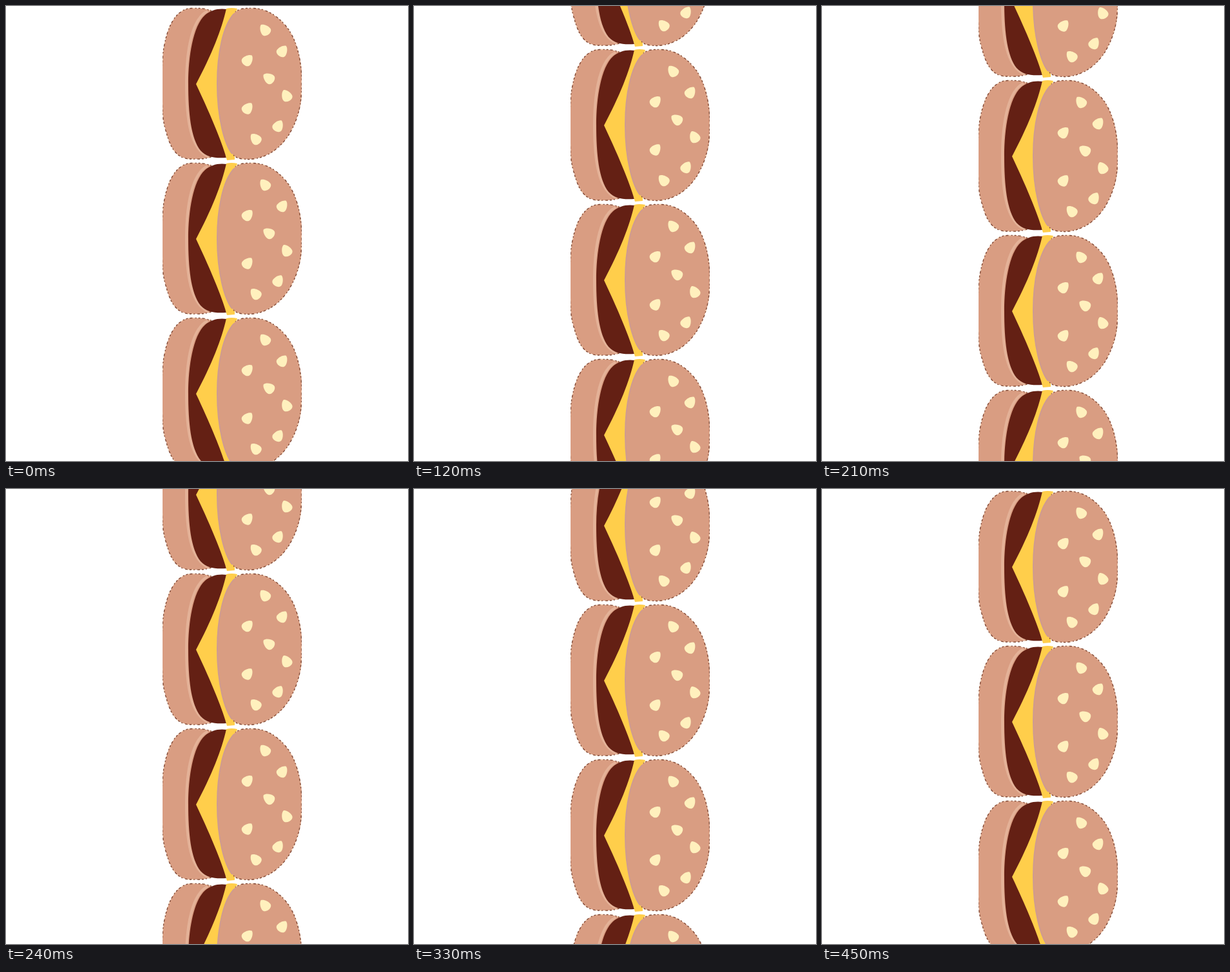
An HTML page with a canvas for the animation above (480 ms loop, 624 by 705 pixels).

```html
<!DOCTYPE html>
<html lang="en">
<head>
<meta charset="utf-8">
<title>Burger stack</title>
<style>
  html, body { margin: 0; width: 100%; height: 100%; overflow: hidden; background: #fff; }
  canvas { display: block; }
</style>
</head>
<body>
<canvas id="stage" width="624" height="705"></canvas>
<script>
const ctx = document.getElementById('stage').getContext('2d');
const LOOP = 480, STEP = 30, SHIFT = 16, PITCH = 240;

const bottomBun = new Path2D(`M318 7 C310 4 300 3 288 3.5 C267 4 255 25 249 47
  C244 65 242 80 242 120 C242 160 243 177 248 193 C254 215 262 237 287 237
  C300 237.5 308 237 318 234 Z`);
const bunRim = new Path2D(`M313 8 C290 18 280 65 280 120 C280 176 286 222 315 234`);
const patty = new Path2D(`M343 5 C330 3 318 6 309 14 C290 31 283 80 283 120
  C283 166 287 205 302 224 C312 235 325 236 342 235 L322 120 Z`);
const cheese = new Path2D(`M342 4 Q350 2 359 4 L357 11 L338 60 L336 180 L355 231
  L355 238 L343 239 C337 216 321 176 295 121 C319 76 335 36 342 4 Z`);
const topBun = new Path2D(`M356 9 C362 4 372 3 384 3.5 C408 4 427 20 439 37
  C453 58 460 88 460 120 C460 151 454 174 440 198 C425 222 403 237 376 237.5
  C366 237.5 358 236 353 231 C340 215 328 176 328 120 C328 73 337 28 356 9 Z`);
const bunSide = new Path2D(`M354 12 C337 30 328 73 328 120 C328 176 340 215 351 229`);
const crust = new Path2D(`M356 9 C362 4 372 3 384 3.5 C408 4 427 20 439 37
  C453 58 459 88 459 120 C459 151 454 174 440 198 C425 222 403 237 376 237.5
  C366 237.5 358 236 353 231`);
const seed = new Path2D('M0 -10 C4 -9 8 -2 8 3 C8 7 4 9 0 9 C-4 9 -8 7 -8 3 C-8 -2 -4 -9 0 -10 Z');

// x, y, tilt in degrees
const seeds = [
  [402, 37, -38], [429, 70, 35], [375, 84, 42], [408, 112, -55],
  [435.5, 139, -28], [375, 158.5, 38], [422.5, 186, 30], [387.5, 206, -42]
];

function fill(path, color) {
  ctx.fillStyle = color;
  ctx.fill(path);
}

function line(path, color, width, dash = [], offset = 0) {
  ctx.strokeStyle = color;
  ctx.lineWidth = width;
  ctx.setLineDash(dash);
  ctx.lineDashOffset = offset;
  ctx.stroke(path);
}

function speckledEdge(path) {
  line(path, '#f3cfb0', 1.6, [2, 7, 3, 5]);
  line(path, '#824936', 1.4, [3, 3, 2, 4, 4, 3], 2);
}

function drawBurger(y) {
  ctx.save();
  ctx.translate(0, y);
  fill(bottomBun, '#d99d82');
  speckledEdge(bottomBun);
  line(bunRim, '#e4b298', 4);
  fill(patty, '#642014');
  fill(cheese, '#ffce4b');
  fill(topBun, '#d99d82');
  line(bunSide, '#cf9b90', 2);
  speckledEdge(crust);
  for (const [x, sy, tilt] of seeds) {
    ctx.save();
    ctx.translate(x, sy);
    ctx.rotate(tilt * Math.PI / 180);
    fill(seed, '#fff0bd');
    ctx.restore();
  }
  ctx.restore();
}

function render(time) {
  const offset = Math.floor((time % LOOP) / STEP) * SHIFT % PITCH;
  ctx.fillStyle = '#fff';
  ctx.fillRect(0, 0, 624, 705);
  ctx.save();
  ctx.beginPath();
  ctx.rect(243, 0, 216, 705);
  ctx.clip();
  for (let y = offset - PITCH; y < 705; y += PITCH) drawBurger(y);
  ctx.restore();
}

const start = performance.now();
function tick() {
  render(performance.now() - start);
  requestAnimationFrame(tick);
}
tick();
</script>
</body>
</html>
```
